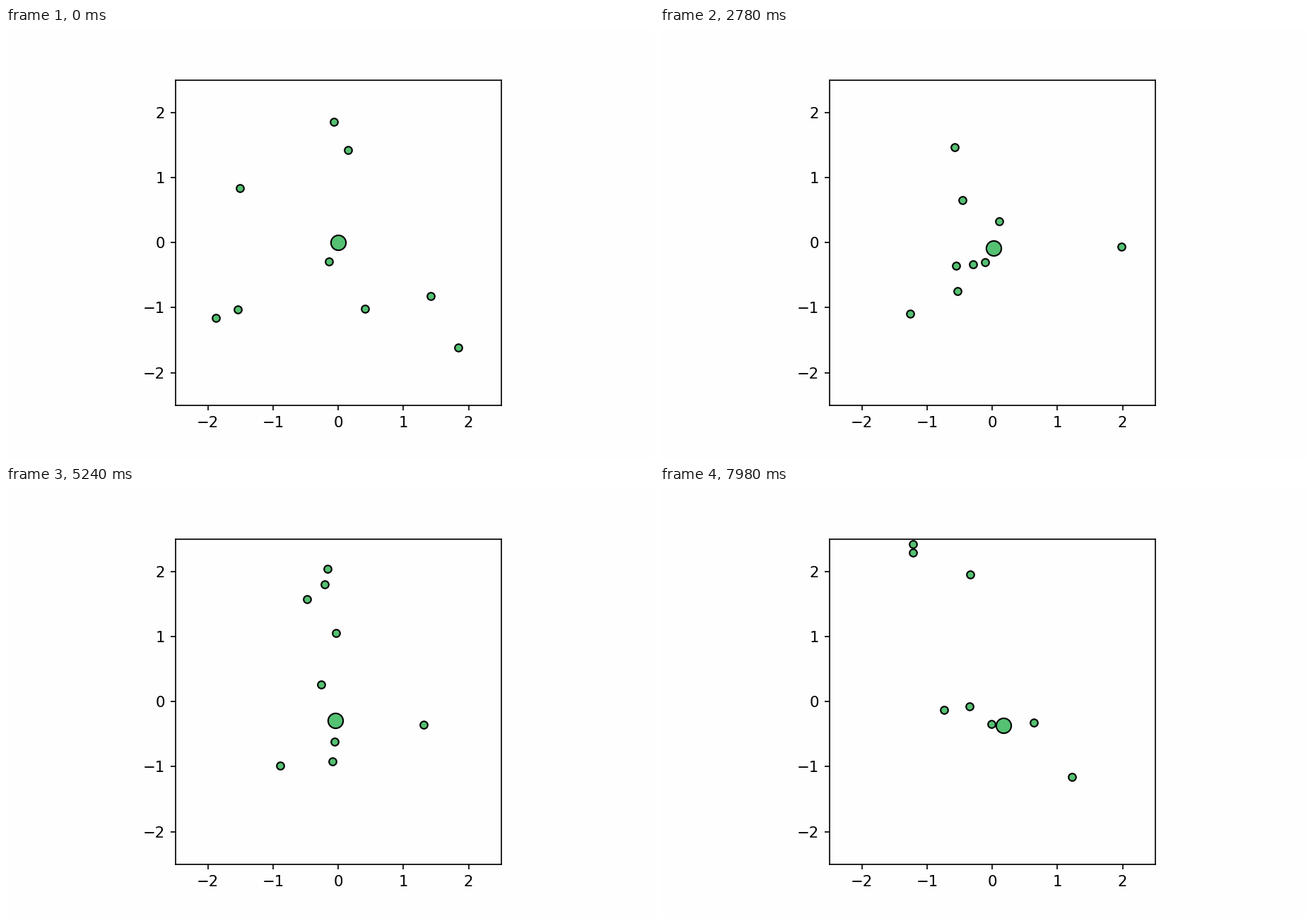
A matplotlib script that plays this animation: 917 by 611 pixels, repeating every 8 s.

```python
import numpy as np
import matplotlib.pyplot as plt
from matplotlib.animation import FuncAnimation

W, H, DPI = 917, 611, 152.75
FRAMES, STEP = 400, 20
GREEN, PAPER = "#55c172", "#fefefe"
LEFT, BOTTOM, SIDE = 239.7, 76.3, 461

t = np.arange(FRAMES) * STEP / 1000
KEYS = np.array([0, 1.62, 2.78, 4.6, 5.9, 7.98])


def drift(*points):
    """Natural cubic spline through one stage point per key time."""
    p, h, n = np.array(points, float), np.diff(KEYS), len(KEYS)
    slope = np.diff(p, axis=0) / h[:, None]
    a, rhs = np.eye(n), np.zeros((n, 2))
    for i in range(1, n - 1):
        a[i, i - 1:i + 2] = h[i - 1], 2 * (h[i - 1] + h[i]), h[i]
        rhs[i] = 6 * (slope[i] - slope[i - 1])
    m = np.linalg.solve(a, rhs)

    i = np.clip(np.searchsorted(KEYS, t, side="right") - 1, 0, n - 2)
    d, g = (t - KEYS[i])[:, None], h[i][:, None]
    b = slope[i] - g * (2 * m[i] + m[i + 1]) / 6
    return p[i] + d * (b + d * (m[i] / 2 + d * (m[i + 1] - m[i]) / (6 * g)))


def around(center, radius, degrees):
    a = np.radians(degrees)
    return center + np.stack([radius * np.cos(a), radius * np.sin(a)], axis=1)


sun = drift((470, 304), (474, 313), (472, 312),
            (467.5, 325.5), (465.5, 334.5), (486, 338))

# A widening, slowing orbit and a swing straight through the centre.
orbiter = around(sun, 30 + 0.9 * t**2, 116 + 310 * t - 15 * t**2)
swinger = around(sun, (105 - 5.5 * t) * np.tanh(2 * np.cos(np.pi * t / 2.25)),
                 68 - 14 * t + 3.6 * t**2)

wanderers = [
    drift((463.5, 133), (428.5, 124), (417, 168.5),
          (421, 308), (507.5, 395), (437.5, 311)),
    drift((484, 172.5), (498.5, 181), (479.5, 273.5),
          (384, 417), (417, 360), (583, 410.5)),
    drift((330.5, 226.5), (335, 282), (419, 336.5),
          (467, 176), (426.5, 120), (357.5, 92.5)),
    drift((328, 399), (362.5, 411), (421, 372.5),
          (443.5, 206), (403.5, 126), (358, 80.5)),
    drift((297, 411), (302, 423), (354, 404.5),
          (543.5, 342), (613.5, 338), (528.5, 333.5)),
    drift((600.5, 379.5), (553, 404), (459.5, 332),
          (461, 147), (442.5, 105), (439, 123.5)),
    drift((640, 453), (669.5, 376.5), (653, 310),
          (538.5, 217.5), (390, 210.5), (208, 275)),
]


def to_data(p):
    x, y = p[..., 0], H - p[..., 1]
    return np.stack([x - LEFT, y - BOTTOM], axis=-1) / SIDE * 5 - 2.5


sun = to_data(sun)
planets = to_data(np.stack([orbiter, swinger, *wanderers], axis=1))

plt.rcParams["font.family"] = "DejaVu Sans"
fig = plt.figure(figsize=(6.0033, 4), dpi=DPI, facecolor=PAPER)
ax = fig.add_axes((LEFT / W, BOTTOM / H, SIDE / W, SIDE / H), facecolor=PAPER)
ax.set(xlim=(-2.5, 2.5), ylim=(-2.5, 2.5),
       xticks=range(-2, 3), yticks=range(-2, 3))
style = dict(color=GREEN, mec="black", mew=1)
big, = ax.plot(*sun[:1].T, "o", ms=10, **style)
small, = ax.plot(*planets[0].T, "o", ms=5, **style)


def draw(i):
    big.set_data(*sun[i:i + 1].T)
    small.set_data(*planets[i].T)
    return big, small


anim = FuncAnimation(fig, draw, frames=FRAMES, interval=STEP,
                     repeat=True, repeat_delay=0, blit=True)
plt.show()
```
